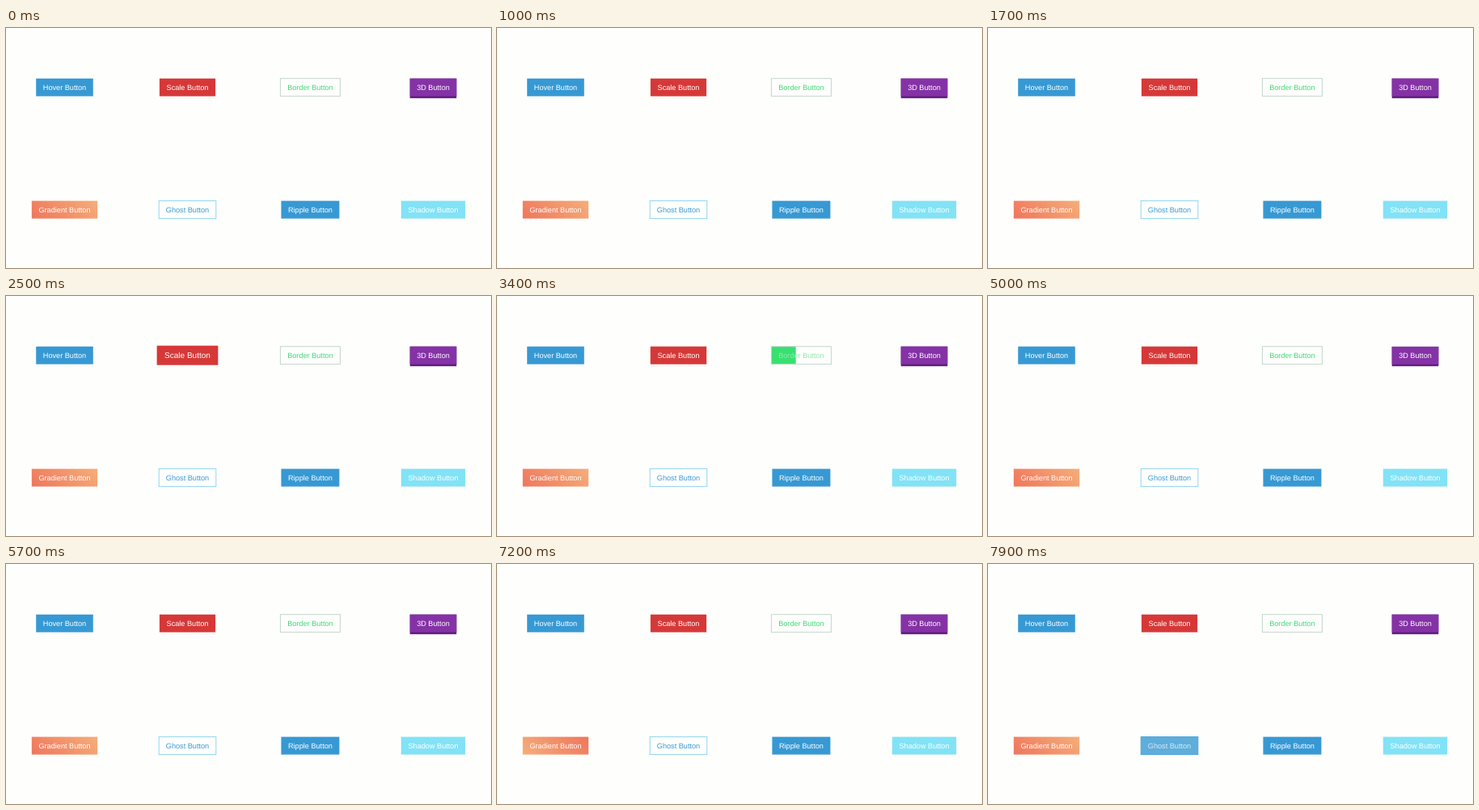
An HTML page that plays this animation: 600x298 px, repeating every 8000 ms.

```html
<!DOCTYPE html>
<html lang="en">
<head>
<meta charset="utf-8">
<title>Button hover effects</title>
<style>
  html, body { margin: 0; width: 100%; height: 100%; overflow: hidden; background: #fefefd; }
  svg { display: block; width: 600px; height: 298px; }
  text {
    font: 9.17px "Liberation Sans", Arial, sans-serif;
    text-anchor: middle;
    text-rendering: geometricPrecision;
  }
</style>
</head>
<body>
<svg id="stage" viewBox="0 0 600 298">
  <defs>
    <linearGradient id="warm" gradientUnits="userSpaceOnUse" x1="46.7" y1="251.3" x2="98.3" y2="199.7">
      <stop stop-color="#ef765c"/>
      <stop offset="1" stop-color="#f5ae7a"/>
    </linearGradient>
  </defs>
</svg>
<script>
const LOOP = 8000, STEP = 100, DURATION = 500;
const BLUE = [55, 153, 211], GREEN = [62, 219, 114], WHITE = [255, 255, 255];
const stage = document.getElementById('stage');

function add(parent, tag, attrs) {
  const el = document.createElementNS('http://www.w3.org/2000/svg', tag);
  set(el, attrs);
  return parent.appendChild(el);
}

function set(el, attrs) {
  for (const name in attrs) el.setAttribute(name, attrs[name]);
}

const rgb = c => `rgb(${c.map(Math.round)})`;
const mix = (a, b, k) => rgb(a.map((v, i) => v + (b[i] - v) * k));

function button(label, cx, cy, width, fill, color = '#fff', stroke = 'none') {
  const height = 22, group = add(stage, 'g', {});
  const box = { x: cx - width / 2, y: cy - height / 2, width, height };
  const rect = add(group, 'rect', { ...box, fill, stroke });
  const text = add(group, 'text', { x: cx, y: cy + 3.3, fill: color });
  text.textContent = label;
  return { group, rect, text, box, cx, cy };
}

const TOP = 73.7, BOTTOM = 225.6;
button('Hover Button', 72.5, TOP, 70.6, rgb(BLUE));
const scale = button('Scale Button', 224.5, TOP, 69.2, '#d63838');
const border = button('Border Button', 376.4, TOP, 74, 'none', rgb(GREEN), '#c3d6c8');
const solid = button('3D Button', 528.5, TOP, 57.6, '#8532a6');
const gradient = button('Gradient Button', 72.5, BOTTOM, 81.4, 'url(#warm)');
const ghost = button('Ghost Button', 224.5, BOTTOM, 70.6, rgb(BLUE), rgb(BLUE), '#8fd6f0');
button('Ripple Button', 376.4, BOTTOM, 72, rgb(BLUE));
button('Shadow Button', 528.5, BOTTOM, 79.4, '#82e2f6');

const wipe = add(border.group, 'rect', { ...border.box, fill: '#38e070' });
border.group.insertBefore(wipe, border.rect);
const edge = add(solid.group, 'rect', { ...solid.box, fill: '#5f1d7c' });
solid.group.insertBefore(edge, solid.rect);

// CSS "ease": cubic-bezier(.25, .1, .25, 1)
function ease(x) {
  if (x <= 0) return 0;
  if (x >= 1) return 1;
  const bezier = (a, b, s) => 3 * a * s * (1 - s) ** 2 + 3 * b * s * s * (1 - s) + s ** 3;
  let low = 0, high = 1;
  for (let i = 0; i < 24; i++) {
    const mid = (low + high) / 2;
    if (bezier(.25, .25, mid) < x) low = mid; else high = mid;
  }
  return bezier(.1, 1, low);
}

// Hover amount; an interrupted transition returns in proportionally less time.
function hover(t, enter, leave) {
  const reached = ease((Math.min(t, leave) - enter) / DURATION);
  return t <= leave ? reached : reached * (1 - ease((t - leave) / (DURATION * reached)));
}

function draw(t) {
  const grow = 1 + .1 * hover(t, 2150, 3020);
  set(scale.group, {
    transform: `translate(${scale.cx} ${scale.cy}) scale(${grow}) translate(${-scale.cx} ${-scale.cy})`
  });

  const fill = hover(t, 3275, 4295);
  set(wipe, { width: border.box.width * fill });
  set(border.text, { fill: mix(GREEN, WHITE, fill) });

  const press = 2 * hover(t, 4950, 5250);
  set(solid.group, { transform: `translate(0 ${press})` });
  set(edge, { height: solid.box.height + 2.5 - press });

  const flipped = t >= 6550 && t < 7450;
  set(gradient.rect, { transform: flipped ? `rotate(180 ${gradient.cx} ${gradient.cy})` : '' });

  const solidity = hover(t, 7650, LOOP);
  set(ghost.rect, {
    'fill-opacity': solidity,
    stroke: mix([143, 214, 240], BLUE, solidity)
  });
  set(ghost.text, { fill: mix(BLUE, WHITE, solidity) });
}

const start = performance.now();
function tick() {
  const t = (performance.now() - start) % LOOP;
  draw(Math.floor(t / STEP) * STEP);
  requestAnimationFrame(tick);
}
tick();
</script>
</body>
</html>
```
